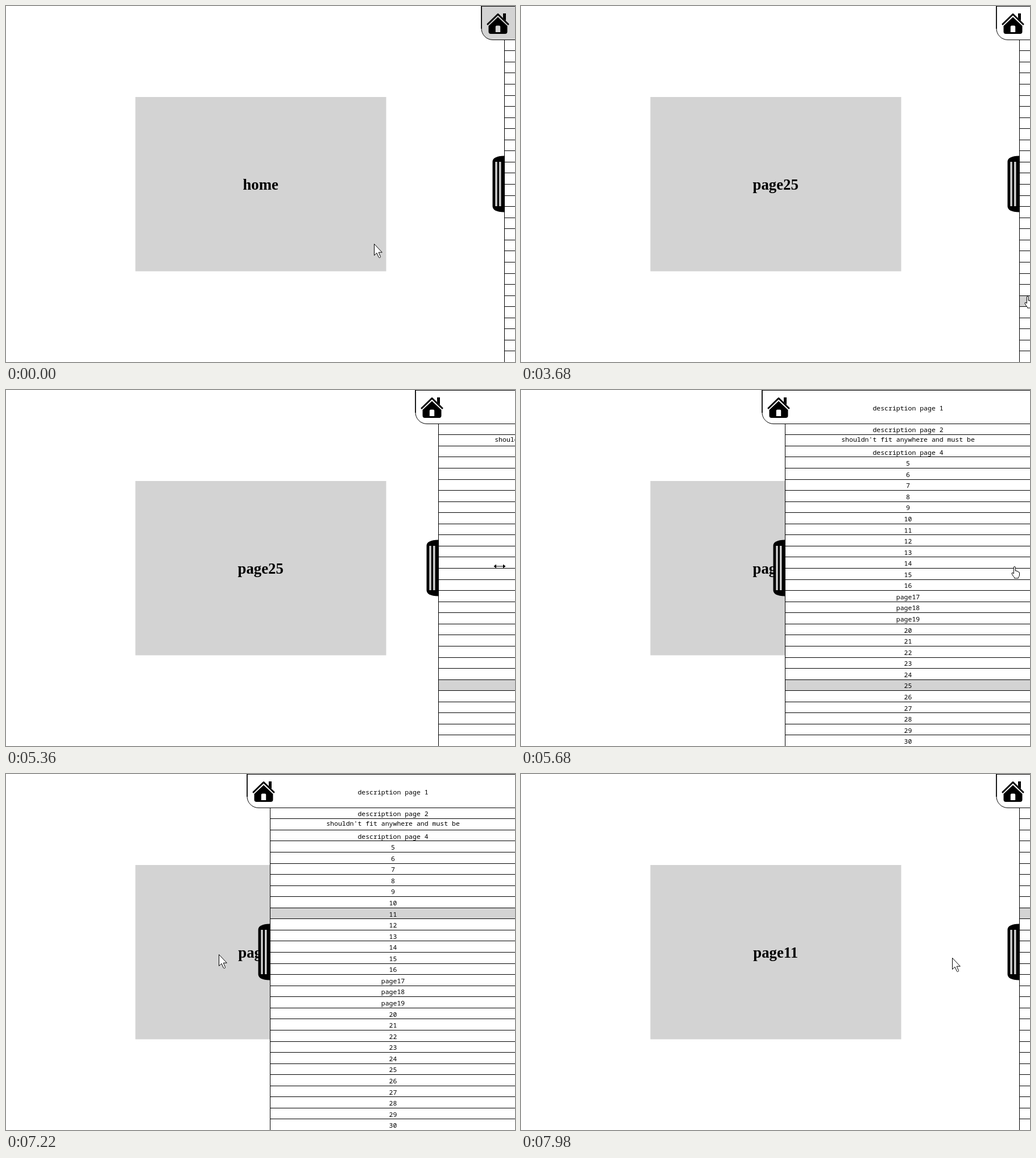
An HTML page for the animation above (8000 ms loop, 895 px wide and 626 px high).

```html
<!DOCTYPE html>
<html lang="en">
<head>
<meta charset="utf-8">
<title>Sliding page index</title>
<style>
  html, body { margin: 0; width: 100%; height: 100%; overflow: hidden; background: #fff; }
  svg { display: block; }
  .title { font: bold 26.8px "Liberation Serif", "Times New Roman", serif; text-anchor: middle; }
  .label { font: 11.5px "Noto Sans Mono", monospace; text-anchor: middle; }
  .crisp { shape-rendering: crispEdges; }
</style>
</head>
<body>
<svg width="895" height="626" viewBox="0 0 895 626">
  <defs><clipPath id="row3"><rect y="78" width="440" height="20"/></clipPath></defs>
  <rect x="227.5" y="160" width="441" height="306.5" fill="#d3d3d3"/>
  <text id="title" class="title" x="447.7" y="323"></text>

  <g id="panel">
    <rect class="crisp" y="59" width="460" height="567" fill="#fff"/>
    <rect id="mark" class="crisp" x="1" width="460" fill="#d3d3d3"/>
    <path id="tab" d="M460 .5H-40V39a20 20 0 0 0 20 20.500H460" stroke="#000"/>
    <path d="M-40 0V40" stroke="#000" stroke-width="1.6"/>
    <g id="rows"></g>
    <rect class="crisp" y="59" width="1" height="567"/>
    <path d="M0 263.5Q-20.5 264-20.5 274V352Q-20.5 362 0 362.5Z"/>
    <path d="M-14 274V352M-7.2 274V352" stroke="#d3d3d3" stroke-width="3.4"/>
    <g id="house">
      <path d="M-29 32L-11 14.500L7 32" fill="none" stroke="#000" stroke-width="3" stroke-linecap="round" stroke-linejoin="round"/>
      <path d="M-2 13H3V26L-2 21.500Z"/>
      <path fill-rule="evenodd" d="M-11 19.500L5.500 35V45q0 4-4 4H-23.500q-4 0-4-4V35ZM-15.200 36.500q0-2 2-2h4.400q2 0 2 2V46h-8.400Z"/>
    </g>
  </g>

  <g id="cursor" stroke="#000" fill="#fff" stroke-linejoin="round">
    <path id="arrow" d="M.5.5V20.500L5 16.300L8.500 24q.8 1 2 .5t1-1.800L8.200 15.200H14.300Z"/>
    <path id="hand" transform="translate(-6.200 0)" d="M4.500 13V2a1.500 1.500 0 0 1 3 0v6q2.400-1 2.700 1q2.200-.8 2.500 1q2-.4 2 2v3q0 3-2 4.500v1.500h-7v-1.500q-2-1.600-4.400-6.300q-.6-1.500 .8-1.800q1.400-.2 2.400 1.600z"/>
    <path id="resize" d="M-10.500 0L-6-3.500V-.5H6V-3.500L10.500 0L6 3.500V.5H-6V3.500Z" fill="#000" stroke="none"/>
  </g>
</svg>
<script>
const LOOP = 8000, STEP = 77, SLIDE = 475;
const CLOSED = 876, OPEN = 464, ROWS = 30;
const UNIT = 626 / (ROWS + 2);   // the home row is three units high
const GREY = "#d3d3d3";

const $ = id => document.getElementById(id);
const rowTop = n => UNIT * (n + 1);
const linePixel = n => Math.round(rowTop(n));
const swing = p => 0.5 - Math.cos(Math.PI * Math.min(1, Math.max(0, p))) / 2;
const stepsSince = (t, start) => Math.floor((t - start) / STEP + 0.1);

// click time and the page it selects
const clicks = [[0, 1], [1310, 7], [2330, 14], [3680, 25], [6830, 11]];

// start time, steps, and the point the pointer travels to
const moves = [
  [140, 4, 818, 190],
  [520, 7, 886, 170],
  [1540, 4, 886, 305],
  [2560, 4, 903, 470],
  [3110, 3, 891, 510],
  [3970, 6, 841, 360],
  [4430, 6, 868, 310],
  [6060, 8, 746, 245],
  [7060, 3, 374, 317],
  [7290, 2, 271, 327],
  [7830, 3, 758, 323]
];

function pointerAt(t) {
  let x = 647, y = 418;
  for (const [start, steps, toX, toY] of moves) {
    const p = swing((stepsSince(t, start) + 1) / steps);
    x += (toX - x) * p;
    y += (toY - y) * p;
  }
  return [x, y];
}

function slide(t, firstStep, start) {
  return swing((firstStep + STEP * stepsSince(t, firstStep) - start) / SLIDE);
}

function panelAt(t) {
  const open = slide(t, 5210, 5195) - slide(t, 7060, 7210);
  return Math.round(CLOSED + (OPEN - CLOSED) * open);
}

function pointerKind(t, x, y, panelX) {
  const dragging = t > 5200 && t < 5660;
  const onHandle = x > panelX - 21 && x < panelX && y > 264 && y < 362;
  return dragging || onHandle ? "resize" : x > panelX ? "hand" : "arrow";
}

function label(text, y, extra = "") {
  return `<text class="label" x="216.5" y="${y}" ${extra}>${text}</text>`;
}

function rowText(n) {
  if (n < 5) return "description page " + n;
  return n > 16 && n < 20 ? "page" + n : n;
}

function buildRows() {
  const clip = 'clip-path="url(#row3)"';
  let html = label(rowText(1), 36);
  for (let n = 2; n <= ROWS; n++) {
    if (n > 2) html += `<rect class="crisp" y="${linePixel(n)}" width="460" height="1"/>`;
    html += n === 3
      ? label("shouldn't fit anywhere and must be", 91, clip) + label("clipped", 105.8, clip)
      : label(rowText(n), rowTop(n) + 15.8);
  }
  $("rows").innerHTML = html;
}

function draw(t) {
  const page = clicks.filter(([time]) => time <= t).pop()[1];
  const home = page === 1;
  $("title").textContent = home ? "home" : "page" + page;
  $("tab").setAttribute("fill", home ? GREY : "#fff");
  $("mark").setAttribute("y", linePixel(page));
  $("mark").setAttribute("height", home ? 0 : UNIT);

  const panelX = panelAt(t), [x, y] = pointerAt(t);
  $("panel").setAttribute("transform", `translate(${panelX} 0)`);
  $("cursor").setAttribute("transform", `translate(${x} ${y})`);
  const kind = pointerKind(t, x, y, panelX);
  for (const id of ["arrow", "hand", "resize"]) {
    $(id).setAttribute("visibility", id === kind ? "visible" : "hidden");
  }
}

buildRows();
const begin = performance.now();
function tick() {
  draw((performance.now() - begin) % LOOP);
  requestAnimationFrame(tick);
}
tick();
</script>
</body>
</html>
```
